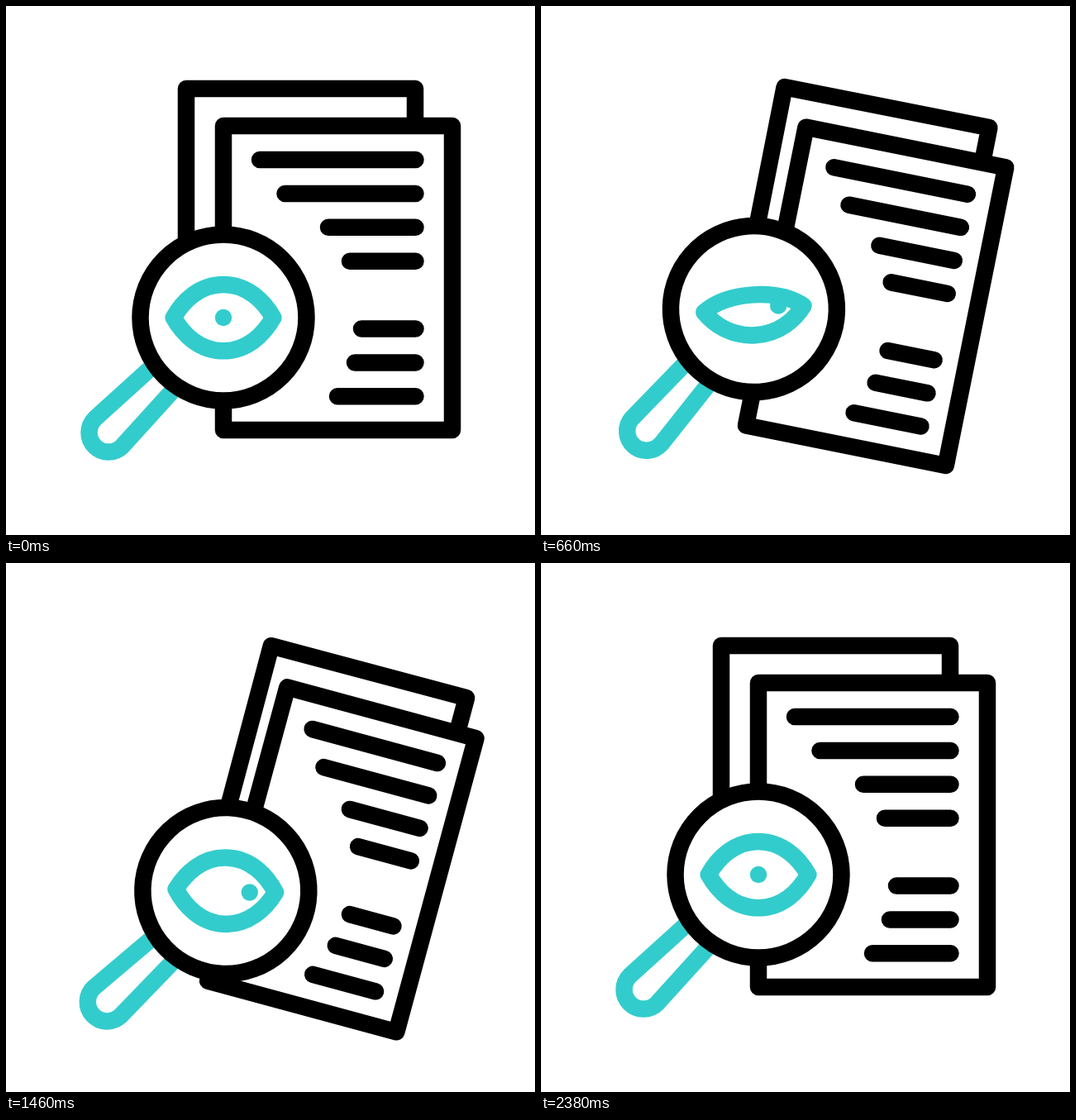
Animation, 640 px wide and 640 px high, one loop 2.4 s. Source, as an HTML page with a canvas:

```html
<!DOCTYPE html>
<html lang="en">
<head>
<meta charset="utf-8">
<title>Document review</title>
<style>
  html, body { margin: 0; width: 100%; height: 100%; overflow: hidden; background: #fff; }
  canvas { display: block; width: 100vw; height: 100vh; object-fit: contain; }
</style>
</head>
<body>
<canvas id="stage" width="640" height="640"></canvas>
<script>
const ctx = document.getElementById('stage').getContext('2d');
const LOOP = 2400, HALF = 1190;
const INK = '#000', TEAL = '#33cccc', PAPER = '#fff', LINE = 20.5;
const RAD = Math.PI / 180;

const PAGE = { w: 138.5, h: 184 };                               // half sizes
const ROW_GAP = 40.9;
const ROWS = [188.5, 158, 105.5, 79.5, 0, 65.5, 73.5, 94.5];     // lengths, 0 is a blank row
const PIVOT = 86;                                                // below the lens centre

// Magnifier swings: time, bob, tilt
const SWINGS = [
  [0, 0, 0],
  [270, 66, 0],
  [560, -28, -7.2],
  [940, 78, 14],
  [HALF, -26, -7.5],
  [1480, 20, 2],
  [1810, 0, 0],
  [LOOP, 0, 0]
];

const clamp = x => Math.min(1, Math.max(0, x));
const smooth = x => (1 - Math.cos(Math.PI * clamp(x))) / 2;
const mix = (a, b, u) => a + (b - a) * u;

// cubic-bezier(.8, 0, .2, 1)
function steep(x) {
  x = clamp(x);
  let lo = 0, hi = 1;
  for (let i = 0; i < 24; i++) {
    const u = (lo + hi) / 2, v = 1 - u;
    if (2.4 * u * v * v + .6 * u * u * v + u * u * u < x) lo = u; else hi = u;
  }
  return lo * lo * (3 - 2 * lo);
}

function swingAt(t) {
  const i = SWINGS.findIndex(s => s[0] > t), a = SWINGS[i - 1], b = SWINGS[i];
  const u = smooth((t - a[0]) / (b[0] - a[0]));
  return [mix(a[1], b[1], u), mix(a[2], b[2], u)];
}

function blinkAt(t) {
  const d = clamp(Math.abs(t - 585) / 150);
  return .8 * Math.cos(d * Math.PI / 2) ** 2;
}

function pupilAt(t) {
  const look = smooth(t / 700) - smooth((t - 1400) / 500);
  return [30 * look, -9 * look * (1 - t / HALF)];
}

function at(x, y, angle, draw) {
  ctx.save();
  ctx.translate(x, y);
  ctx.rotate(angle * RAD);
  draw();
  ctx.restore();
}

function stroke(color) {
  ctx.strokeStyle = color;
  ctx.stroke();
}

function fill(color) {
  ctx.fillStyle = color;
  ctx.fill();
}

function circle(x, y, r) {
  ctx.beginPath();
  ctx.arc(x, y, r, 0, Math.PI * 2);
}

function drawBackPage(p) {
  const w = PAGE.w * (1 - .122 * p);
  ctx.beginPath();
  ctx.moveTo(-w, 85);
  ctx.lineTo(-w, -PAGE.h);
  ctx.lineTo(w, -PAGE.h);
  ctx.lineTo(w, 46 - PAGE.h);
  stroke(INK);
}

function drawFrontPage(p) {
  const w = PAGE.w * (1 - .152 * p), k = 1 - .175 * p, right = 94 * k + 3 * p;
  ctx.beginPath();
  ctx.rect(-w, -PAGE.h, 2 * w, 2 * PAGE.h);
  fill(PAPER);
  stroke(INK);
  ctx.beginPath();
  ROWS.forEach((length, i) => {
    if (!length) return;
    const y = ROW_GAP * i - 143;
    ctx.moveTo(right - length * k, y);
    ctx.lineTo(right, y);
  });
  stroke(INK);
}

function drawHandle() {
  ctx.beginPath();
  ctx.moveTo(95, 18.5);
  ctx.lineTo(196.6, 23.5);
  ctx.arc(196.6, 0, 23.5, Math.PI / 2, -Math.PI / 2, true);
  ctx.lineTo(95, -18.5);
  stroke(TEAL);
}

function drawLens() {
  circle(0, 0, 100.5);
  fill(PAPER);
  stroke(INK);
}

function eyePath(lid) {
  const curve = (side, y) => {
    ctx.bezierCurveTo(-49 * side, y / 2, -29 * side, y, 0, y);
    ctx.bezierCurveTo(29 * side, y, 49 * side, y / 2, 60.3 * side, 0);
  };
  ctx.beginPath();
  ctx.moveTo(-60.3, 0);
  curve(1, -40 + 58 * lid);
  curve(-1, 40.3 - 22 * lid);
  ctx.closePath();
}

function drawEye(t, tilt) {
  const lid = blinkAt(t);
  ctx.save();
  eyePath(lid);
  ctx.clip();
  ctx.rotate(-tilt * RAD);
  circle(...pupilAt(t), 10.2);
  fill(TEAL);
  ctx.restore();
  eyePath(lid);
  stroke(TEAL);
}

function render(t) {
  const p = steep(t / HALF) - steep((t - HALF) / HALF);
  const [bob, tilt] = swingAt(t);
  ctx.fillStyle = PAPER;
  ctx.fillRect(0, 0, 640, 640);
  ctx.lineWidth = LINE;
  ctx.lineCap = ctx.lineJoin = 'round';
  at(356.5 + 36.5 * p, 284 + 26.5 * p, 15.5 * p, () => drawBackPage(p));
  at(401.5 + 5 * p, 329 + 31 * p, 15.75 * p, () => drawFrontPage(p));
  at(263, 377 + PIVOT + bob, tilt, () => {
    ctx.translate(0, -PIVOT);
    at(0, 0, 135, drawHandle);
    drawLens();
    drawEye(t, tilt);
  });
}

const start = performance.now();
function tick() {
  render((performance.now() - start) % LOOP);
  requestAnimationFrame(tick);
}
tick();
</script>
</body>
</html>
```
